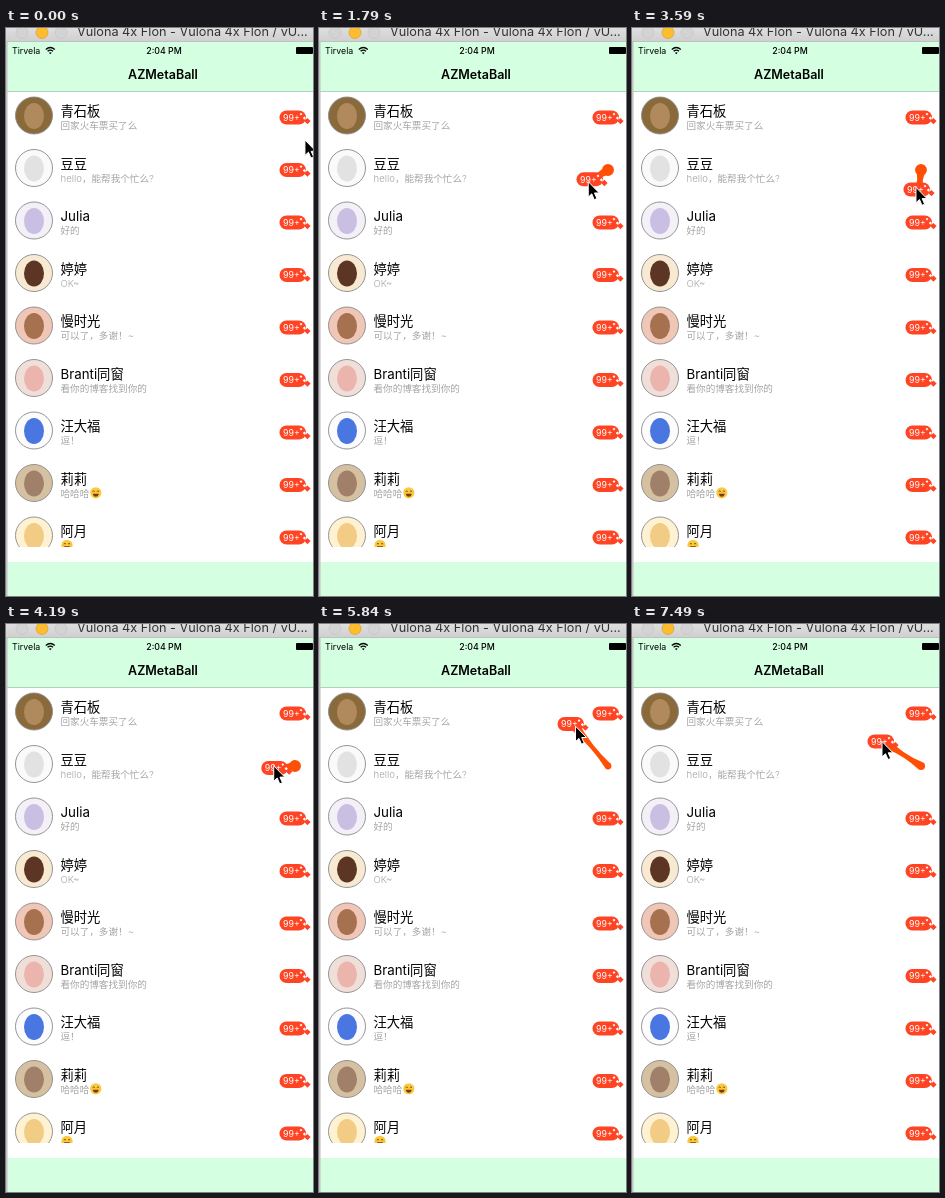
Write an HTML page that moves like this. It is 307x568 px and loops after 8 s.

```html
<!DOCTYPE html>
<html lang="zh">
<head>
<meta charset="utf-8">
<title>AZMetaBall</title>
<style>
  html, body { margin: 0; width: 100%; height: 100%; overflow: hidden; background: #fff; }
  svg { display: block; width: 100%; height: 100%; }
  text { font-family: Inter, "Noto Sans CJK SC", "Noto Sans CJK", sans-serif; }
  .name { font-size: 13.3px; fill: #000; }
  .note { font-size: 9.6px; font-weight: 300; fill: #a4a4a4; }
  .count { font-size: 8.8px; fill: #fff; }
  .status { font-size: 8.8px; fill: #000; }
</style>
</head>
<body>
<svg viewBox="0 0 307 568">
  <defs>
    <linearGradient id="bar" x2="0" y2="1">
      <stop stop-color="#dedede"/><stop offset="1" stop-color="#cfcfcf"/>
    </linearGradient>
    <clipPath id="list"><rect y="64" width="307" height="455"/></clipPath>
    <path id="diamond" d="M0-1L1 0 0 1-1 0z"/>
    <g id="badge">
      <rect x="-15.5" y="-7" width="26.5" height="14" rx="7" fill="#ff4423"/>
      <use href="#diamond" transform="translate(12.4 3.6) scale(3.2)" fill="#ff4423"/>
      <use href="#diamond" transform="translate(6 -3.4) scale(1.4)" fill="#fff"/>
      <use href="#diamond" transform="translate(9.4 .6) scale(1.6)" fill="#fff"/>
      <text class="count" x="-12" y="3.2">99+</text>
    </g>
    <g id="smile">
      <circle r="5.6" fill="#fcc93c"/>
      <path d="M-3.2-1.2q1.2-1.4 2.2 0M1-1.2q1-1.4 2.2 0" fill="none" stroke="#6b4318" stroke-width=".9"/>
      <path d="M-3 1h6q-.6 3-3 3t-3-3z" fill="#7a3a14"/>
    </g>
  </defs>

  <rect width="307" height="568" fill="#fff"/>
  <g fill="#d4ffe1">
    <rect y="14" width="307" height="49.5"/>
    <rect y="534" width="307" height="34"/>
  </g>
  <rect y="63" width="307" height="1" fill="#b4cfbc"/>
  <rect width="307" height="14" fill="url(#bar)"/>
  <rect y="13.3" width="307" height=".7" fill="#b9b9b9"/>
  <g stroke-width=".7" fill="#d3d3d3" stroke="#c4c4c4">
    <circle cx="16" cy="4.5" r="6"/>
    <circle cx="36" cy="4.5" r="6" fill="#fdbd2e" stroke="#dfa023"/>
    <circle cx="55" cy="4.5" r="6"/>
  </g>
  <text x="71" y="8.4" font-size="12.7" fill="#333">Vulona 4x Flon - Vulona 4x Flon / vU...</text>
  <rect y="14" width="1.6" height="554" fill="#c3c3c3"/>

  <text class="status" x="6" y="26">Tirvela</text>
  <g fill="none" stroke="#000" stroke-width="1.3">
    <path d="M39.8 21.4q4.5-3.8 9 0M41.6 23.3q2.7-2.3 5.4 0"/>
    <path d="M44.3 26.3l-1.4-1.6q1.4-1 2.8 0z" fill="#000" stroke="none"/>
  </g>
  <text class="status" x="158" y="26" text-anchor="middle" font-weight="500">2:04 PM</text>
  <rect x="290" y="19" width="17" height="7" rx="1" fill="#000"/>
  <text x="157" y="51.3" text-anchor="middle" font-size="12.5" font-weight="600">AZMetaBall</text>

  <g id="rows" clip-path="url(#list)"></g>
  <g id="drag">
    <path id="blob" fill="#ff4f05"/>
    <use id="moving" href="#badge"/>
  </g>
  <path id="cursor" d="M0 0V15.4L3.5 12.2 6 18 8.7 16.9 6.2 11.3H11z" fill="#000" stroke="#fff"/>
</svg>
<script>
const LOOP = 8000, STEP = 150, DRAG_START = 1640, LAG = 75;
const HOME = { x: 289, y: 142 }, ROW = 52.5, ACTIVE = 1;
const $ = id => document.getElementById(id);

// name, message, avatar background, avatar shape, ends with a smile
const contacts = [
  ['青石板', '回家火车票买了么', '#8a6a3a', '#b08a5c'],
  ['豆豆', 'hello，能帮我个忙么?', '#fafafa', '#e2e2e2'],
  ['Julia', '好的', '#f4f0f8', '#c9bfe2'],
  ['婷婷', 'OK~', '#f8ead2', '#5c3524'],
  ['慢时光', '可以了，多谢！~', '#f0c6b6', '#a5714f'],
  ['Branti同窗', '看你的博客找到你的', '#f0dfd8', '#ebb5ae'],
  ['汪大福', '逗！', '#fcfcff', '#4a76e2'],
  ['莉莉', '哈哈哈', '#d6c0a2', '#a08068', true],
  ['阿月', '', '#fff2d2', '#f2cb84', true]
];

$('rows').innerHTML = contacts.map(([name, note, back, shape, smile], i) => `
  <g transform="translate(0 ${i * ROW})">
    <circle cx="28" cy="87.5" r="18.5" fill="${back}" stroke="#8a8a8a" stroke-width=".9"/>
    <ellipse cx="28" cy="88" rx="10" ry="13" fill="${shape}"/>
    <text class="name" x="54.5" y="88.3">${name}</text>
    <text class="note" x="54.5" y="101">${note}</text>
    ${smile ? `<use href="#smile" x="${61 + note.length * 9.6}" y="97.3"/>` : ''}
    <use class="home" href="#badge" x="${HOME.x}" y="89.5"/>
  </g>`).join('');
const homeBadge = document.querySelectorAll('.home')[ACTIVE];

// Key points of the hand: time, x, y
const path = [
  [0, 301, 110], [1200, 284, 142], [1490, 284, 142],
  [2390, 251, 170], [2840, 251, 170], [3590, 287, 161.5],
  [4790, 254.5, 126.5], [5840, 254, 100], [6590, 289, 122],
  [6890, 289, 122], [7490, 251, 117.5], [LOOP + LAG, 251, 117.5]
];

function handAt(t) {
  const i = Math.max(1, path.findIndex(p => p[0] >= t));
  const [t0, x0, y0] = path[i - 1], [t1, x1, y1] = path[i];
  const k = (t - t0) / (t1 - t0);
  return { x: x0 + (x1 - x0) * k, y: y0 + (y1 - y0) * k };
}

const disc = (p, r) =>
  `M${p.x - r} ${p.y}a${r} ${r} 0 1 0 ${2 * r} 0a${r} ${r} 0 1 0 ${-2 * r} 0z`;

// Two discs joined by a neck whose sides bend towards the middle.
function metaball(a, b) {
  const dx = b.x - a.x, dy = b.y - a.y, d = Math.hypot(dx, dy) || 1;
  const ra = Math.max(3.4, 7.3 - d / 14), rb = 5.5;
  const side = (p, r) => `${p.x - dy / d * r} ${p.y + dx / d * r}`;
  const mid = `${(a.x + b.x) / 2} ${(a.y + b.y) / 2}`;
  return disc(a, ra) + disc(b, rb) +
    `M${side(a, ra)}Q${mid} ${side(b, rb)}L${side(b, -rb)}Q${mid} ${side(a, -ra)}z`;
}

const place = (el, x, y) => el.setAttribute('transform', `translate(${x} ${y})`);

function draw(time) {
  const dragging = time >= DRAG_START;
  const base = dragging ? DRAG_START : 0;
  const t = base + Math.floor((time - base) / STEP) * STEP;
  const pointer = handAt(t + LAG), badge = handAt(t);
  place($('cursor'), pointer.x - 1, pointer.y);
  homeBadge.style.display = dragging ? 'none' : '';
  $('drag').style.display = dragging ? '' : 'none';
  $('blob').setAttribute('d', metaball(HOME, badge));
  place($('moving'), badge.x, badge.y);
}

const start = performance.now();
function tick() {
  draw((performance.now() - start) % LOOP);
  requestAnimationFrame(tick);
}
tick();
</script>
</body>
</html>
```
